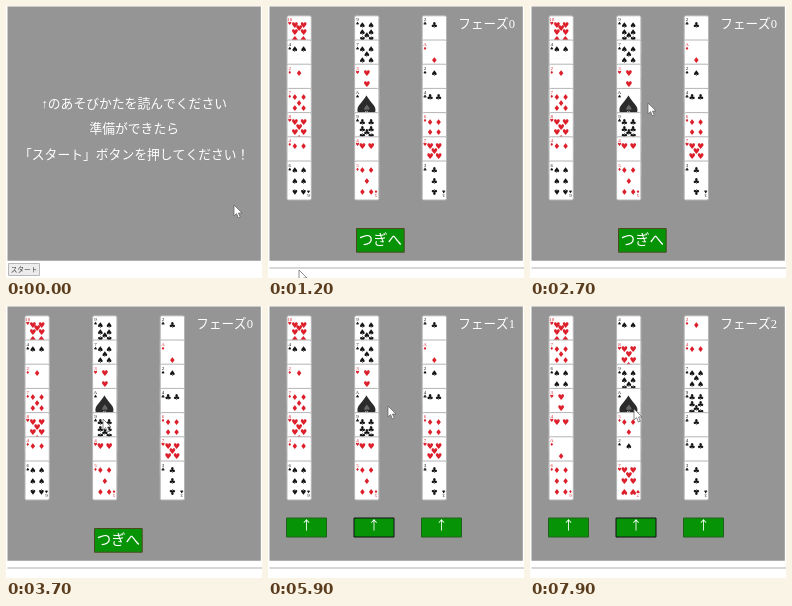
Recreate the animation shown at these times as an HTML page with a canvas. Size 256x272 px, loop 8 s.

```html
<!DOCTYPE html>
<html lang="ja">
<head>
<meta charset="utf-8">
<title>カードあて</title>
<style>
html, body { margin: 0; width: 100%; height: 100%; overflow: hidden; background: #fff; }
canvas { display: block; width: 256px; height: 272px; }
</style>
</head>
<body>
<canvas></canvas>
<script>
const canvas = document.querySelector('canvas');
const scale = window.devicePixelRatio || 1;
canvas.width = 256 * scale;
canvas.height = 272 * scale;
const ctx = canvas.getContext('2d');

const LOOP = 8000, STEP = 100, MAX_MOVE = 500;
const DEALT_AT = 1000, PHASE1_AT = 4900, PHASE2_AT = 7100;
const GOTHIC = '"Noto Sans CJK JP", "Noto Sans CJK", sans-serif';
const MESSAGE = '"Liberation Sans", ' + GOTHIC;
const SERIF = '"Liberation Serif", ' + GOTHIC;
const SUITS = '"DejaVu Sans", sans-serif';
const CARD_W = 24.3, CARD_H = 39, ROW = 24.2, COLUMN = 67.6;

const deck = ('10♥ 4♠ 2♦ 7♦ 8♥ 4♦ 6♠ 9♠ 7♠ 3♥ A♠ 9♣ 4♥ 5♦ ' +
  '2♣ A♦ 2♠ 4♣ 6♦ 7♥ 3♣').split(' ');
const firstDeal = [0, 1, 2].map(c => deck.slice(c * 7, c * 7 + 7));
const secondDeal = [0, 1, 2].map(c => deck.filter((_, i) => i % 3 === c));

// Where the pointer rests: arrival time, x, y
const STOPS = [
  [0, 228, 199], [300, 125, 180], [900, 20, 262], [1200, 31, 264], [1900, 118, 233],
  [2500, 118, 97], [3700, 97, 113], [4000, 112, 233], [4800, 122, 240],
  [5500, 120, 100], [6700, 106, 222], [7500, 111, 100], [7900, 104, 103]
];

function pointerAt(t) {
  const next = STOPS.findIndex(s => s[0] > t);
  if (next < 0) return { x: STOPS.at(-1)[1], y: STOPS.at(-1)[2] };
  const [left, x0, y0] = STOPS[next - 1], [arrive, x1, y1] = STOPS[next];
  const start = Math.max(left, arrive - MAX_MOVE);
  const k = Math.max(0, (t - start) / (arrive - start)), e = k * k * (3 - 2 * k);
  return { x: x0 + (x1 - x0) * e, y: y0 + (y1 - y0) * e };
}

function text(str, x, y, size, family, color = '#fff', align = 'center') {
  ctx.font = `${size}px ${family}`;
  ctx.fillStyle = color;
  ctx.textAlign = align;
  ctx.fillText(str, x, y);
}

function box(x, y, w, h, fill, stroke, radius = 0) {
  ctx.beginPath();
  ctx.roundRect(x, y, w, h, radius);
  ctx.fillStyle = fill;
  ctx.fill();
  if (!stroke) return;
  ctx.strokeStyle = stroke;
  ctx.lineWidth = 1;
  ctx.stroke();
}

function at(x, y, turned, draw) {
  ctx.save();
  ctx.translate(x, y);
  if (turned) ctx.rotate(Math.PI);
  draw();
  ctx.restore();
}

// Pip heights run from 0 (top) to 1 (bottom)
function pipHeights(rank) {
  const rows = rank > 8 ? 4 : rank > 5 ? 3 : rank > 3 ? 2 : 0;
  const extra = rank - 2 * rows;
  const inset = rows === 0 && extra > 1 ? 0 : rows % 2 === 0 && extra === 1 ? .5 : .5 / (rows - 1);
  return {
    sides: Array.from({ length: rows }, (_, i) => i / (rows - 1)),
    centre: Array.from({ length: extra }, (_, i) => inset + i * (1 - 2 * inset) / (extra - 1 || 1))
  };
}

function drawCard(name, x, y) {
  const suit = name.slice(-1), rank = name.slice(0, -1);
  const color = '♥♦'.includes(suit) ? '#dc1f2b' : '#151515';
  const corner = () => {
    text(rank, 2.8, 5.6, 5, SERIF, color);
    text(suit, 2.8, 9.6, 4.5, SUITS, color);
  };
  const pip = (pipX, t) => at(pipX, 9 + 21.5 * t, t > .5, () => text(suit, 0, 2.9, 8, SUITS, color));
  at(x, y, false, () => {
    box(0, 0, CARD_W, CARD_H, '#fff', '#b4b4b4', 1.5);
    corner();
    at(CARD_W, CARD_H, true, corner);
    if (name === 'A♠') {
      text(suit, CARD_W / 2, 30, 31, SUITS, '#2b2b2b');
      text(suit, CARD_W / 2, 23, 9, SUITS, '#686868');
      return;
    }
    const { sides, centre } = pipHeights(rank === 'A' ? 1 : +rank);
    for (const t of sides) {
      pip(7.8, t);
      pip(CARD_W - 7.8, t);
    }
    for (const t of centre) pip(CARD_W / 2, t);
  });
}

function buttonsFor(phase) {
  if (phase < 0) return [];
  if (phase === 0) {
    return [{ x: 88, y: 222, w: 48.7, h: 24.7, label: 'つぎへ', baseline: 239.3, size: 14.4, border: '#4a4a20' }];
  }
  return [0, 1, 2].map(i => ({
    x: 18 + 67.5 * i, y: 211.5, w: 41, h: 20, label: '↑', baseline: 223.5, size: 12.5,
    border: i === 1 ? '#111' : '#20601c'
  }));
}

const isOver = (b, p) => p.x >= b.x && p.x < b.x + b.w && p.y >= b.y && p.y < b.y + b.h;

function drawButton(b, pointer) {
  const fill = isOver(b, pointer) ? '#f8a00c' : '#069306';
  box(b.x + .5, b.y + .5, b.w - 1, b.h - 1, fill, b.border);
  text(b.label, b.x + b.w / 2, b.baseline, b.size, GOTHIC);
}

function drawPointer({ x, y }, hand) {
  const shape = new Path2D(hand
    ? 'M0 1Q1 -1 2 1V5L6 6Q7 6 7 8L6 12H1L-2 8Q-2 6 0 8Z'
    : 'M0 0V11L2.6 8.6L4.4 13L6.3 12.2L4.5 8H8Z');
  at(x, y, false, () => {
    ctx.fillStyle = '#fff';
    ctx.fill(shape);
    ctx.strokeStyle = '#5c5c5c';
    ctx.lineWidth = .7;
    ctx.stroke(shape);
  });
}

function drawStartScreen() {
  const lines = ['↑のあそびかたを読んでください', '準備ができたら', '「スタート」ボタンを押してください！'];
  lines.forEach((line, i) => text(line, 128.2, 102 + 25.4 * i, 12.8, MESSAGE));
  box(2.5, 257.5, 31, 12, '#ececec', '#b8b8b8');
  text('スタート', 18, 266, 6.7, GOTHIC, '#444');
}

function draw(t) {
  const phase = [DEALT_AT, PHASE1_AT, PHASE2_AT].filter(start => t >= start).length - 1;
  const pointer = pointerAt(t), buttons = buttonsFor(phase);
  ctx.setTransform(scale, 0, 0, scale, 0, 0);
  box(0, 0, 256, 272, '#fff');
  box(1.5, .5, 253.3, 254.2, '#959595');
  if (phase < 0) {
    drawStartScreen();
  } else {
    box(1.5, 261.5, 254.5, 1, '#b0b0b0');
    text('フェーズ' + phase, 190.3, 21.5, 12.6, SERIF, '#fff', 'left');
    (phase < 2 ? firstDeal : secondDeal).forEach((column, c) =>
      column.forEach((card, r) => drawCard(card, 19 + COLUMN * c, 9.8 + ROW * r)));
    buttons.forEach(b => drawButton(b, pointer));
  }
  drawPointer(pointer, buttons.some(b => isOver(b, pointer)));
}

function tick() {
  draw(Math.floor(performance.now() % LOOP / STEP) * STEP);
  requestAnimationFrame(tick);
}
tick();
</script>
</body>
</html>
```
